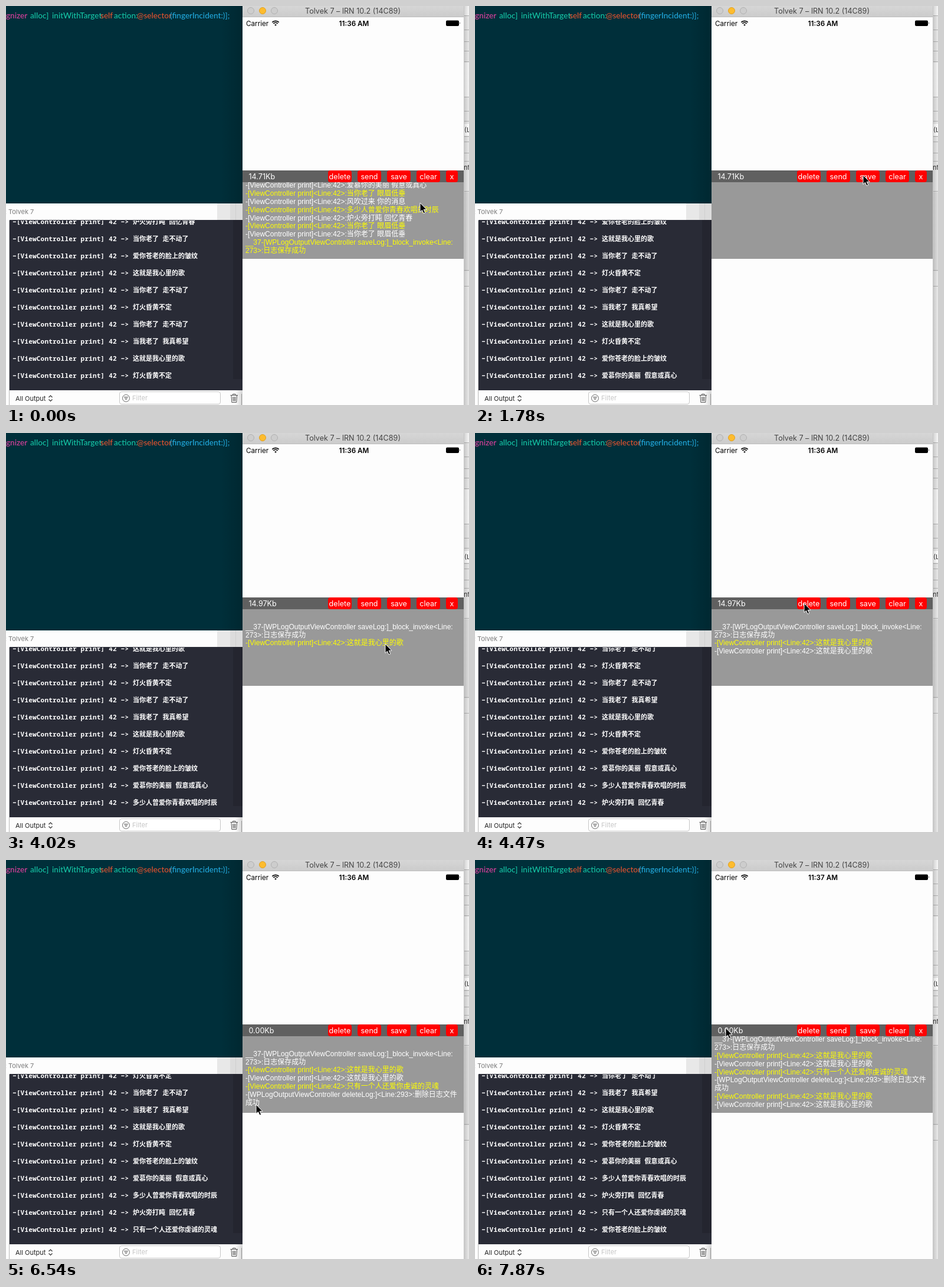
Recreate the animation shown at these times as an HTML page. Size 785 by 677 pixels, loop 8 s.

```html
<!DOCTYPE html>
<html lang="zh-CN">
<head>
<meta charset="utf-8">
<title>Log panel</title>
<style>
  html, body { margin: 0; width: 100%; height: 100%; overflow: hidden; }
  svg { display: block; }
  text { white-space: pre; font: 12.6px Inter, "Open Sans", sans-serif; }
  .mid { text-anchor: middle; }
  .code text { font: 500 13.6px Lato, sans-serif; }
  .small text { font-size: 11px; }
  #console text { font: 600 11px "Noto Sans Mono", "Noto Sans CJK SC", "Noto Sans CJK", monospace; fill: #fff; }
  #console .head { letter-spacing: .2px; }
  #panel text { font: 12px "Liberation Sans", "Noto Sans CJK SC", "Noto Sans CJK", sans-serif; }
</style>
</head>
<body>
<svg width="785" height="677" viewBox="0 0 785 677">
  <defs>
    <clipPath id="consoleClip"><path d="M6 364H401V651H6Z"/></clipPath>
    <clipPath id="panelClip"><path d="M401 299H776V429H401Z"/></clipPath>
    <linearGradient id="bar" x2="0" y2="1"><stop stop-color="#d6d6d6"/><stop offset="1" stop-color="#cbcbcb"/></linearGradient>
    <linearGradient id="shade"><stop stop-color="#000" stop-opacity="0"/><stop offset="1" stop-color="#000" stop-opacity=".16"/></linearGradient>
  </defs>
  <rect width="785" height="677" fill="#fdfdfd"/>

  <!-- editor -->
  <rect width="401" height="335" fill="#002f3a"/>
  <g class="code">
    <text x="0" y="21" fill="#d9409c">gnizer</text>
    <text x="41" y="21" fill="#14c3a4">alloc]</text>
    <text x="78" y="21" fill="#14c3a4">initWithTarget:</text>
    <text x="160" y="21" fill="#e0522f">self</text>
    <text x="183" y="21" fill="#14c3a4">action:</text>
    <text x="222" y="21" fill="#e0522f">@selector</text>
    <text x="278" y="21" fill="#21a8dc">(fingerIncident:)];</text>
  </g>
  <rect x="364" width="37" height="335" fill="url(#shade)"/>

  <!-- tab strip -->
  <rect x="358" y="335" width="22" height="28" fill="#e8e8e8"/>
  <rect x="380" y="335" width="21" height="28" fill="#dcdcdc"/>
  <path d="M389.5 335V363" stroke="#cfcfcf"/>
  <g class="small" fill="#7c7c7c"><text x="-2" y="353">:</text><text x="4" y="353">Tolvek 7</text></g>

  <!-- console -->
  <rect x="6" y="363" width="395" height="289" fill="#292b36"/>
  <rect x="385" y="363" width="16" height="270" fill="#000" opacity=".13"/>
  <path d="M5.5 364V677" stroke="#b8b8b8"/>
  <g id="console" clip-path="url(#consoleClip)"></g>
  <g class="small">
    <text x="16" y="670" fill="#222">All Output</text>
    <path d="M72.5 664L75.5 661L78.5 664M72.5 667.5L75.5 670.5L78.5 667.5" fill="none" stroke="#333" stroke-width="1.2"/>
    <rect x="192.5" y="654.5" width="171" height="21" rx="3.5" fill="#fff" stroke="#c6c6c6"/>
    <circle cx="203.5" cy="665.5" r="6" fill="none" stroke="#666"/>
    <path d="M200 663.5H207M201 665.5H206M202 667.5H205" stroke="#666"/>
    <text x="214" y="669" fill="#c6c6c6">Filter</text>
    <path d="M380.5 660.5H393M384.5 660V658.5H389V660M382 661L382.8 672.5H390.7L391.5 661M384.7 663L385 670.5M386.8 663V670.5M388.8 663L388.5 670.5" fill="none" stroke="#555"/>
    <rect x="388" y="652" width="13" height="25" fill="url(#shade)"/>
    <path d="M399.5 658V677" stroke="#999"/>
  </g>

  <!-- window behind, right edge -->
  <rect x="776" width="9" height="677" fill="#e9e9e9"/>
  <path d="M777 0H785V16H777ZM777 96H785V155H777Z" fill="#f6f6f6"/>
  <path d="M777 316H785V450H777Z" fill="#dedede"/>
  <path d="M777 16.5h8m-8 24h8m-8 20h8m-8 16h8m-8 18h8m-8 60h8m-8 24h8m-8 17h8m-8 26h8m-8 9h8m-8 19h8m-8 14h8m-8 51h8m-8 134h8m-8 27h8" stroke="#b4b4b4"/>
  <rect x="777" y="200" width="8" height="20" fill="#fff"/>
  <g class="small" fill="#333"><text x="777" y="214">(L</text><text x="776" y="278">nt</text></g>
  <rect x="-785" width="9" height="677" fill="url(#shade)" transform="scale(-1 1)"/>

  <!-- phone window -->
  <rect x="401" width="375" height="677" fill="#fdfdfd"/>
  <rect x="401" width="375" height="19" fill="url(#bar)"/>
  <path d="M401 18.5H776" stroke="#bcbcbc"/>
  <g fill="#cdcdcd" stroke="#b1b1b1">
    <circle cx="415" cy="8" r="5.5"/><circle cx="455" cy="8" r="5.5"/>
    <circle cx="435" cy="8" r="5.5" fill="#fdbc2e" stroke="#dfa023"/>
  </g>
  <text class="mid" x="588" y="13" fill="#444">Tolvek 7 – lRN 10.2 (14C89)</text>
  <text x="407" y="33.5" style="font-size:11.7px">Carrier</text>
  <g fill="none" stroke="#000" stroke-width="1.7">
    <path d="M451.3 27.6A8.3 8.3 0 0 1 462.7 27.6M453.4 29.9A5.2 5.2 0 0 1 460.6 29.9"/>
    <path d="M457 33.8L455.2 31.9A2.6 2.6 0 0 1 458.8 31.9Z" fill="#000" stroke="none"/>
  </g>
  <text id="clock" class="mid" x="590" y="33.5" style="font-size:11.7px;font-weight:600"></text>
  <rect x="746" y="24.5" width="22" height="9.5" rx="2"/>
  <path d="M769 27.2Q770.6 29 769 30.8Z"/>

  <!-- log panel -->
  <rect x="401" y="299" width="375" height="130" fill="#999"/>
  <g id="panel" clip-path="url(#panelClip)"></g>
  <rect x="401" y="279" width="375" height="20" fill="#606060"/>
  <text id="size" x="411.5" y="293.5" fill="#fff"></text>
  <g id="buttons"></g>

  <path id="cursor" d="M0 0V15.5L3.5 12.3L6 18L8.7 16.9L6.2 11.3H11Z" stroke="#fff"/>
</svg>
<script>
const LOOP = 8000, STEP = 148.3;
const $ = id => document.getElementById(id);
const text = (x, y, s, attrs = '') =>
  `<text x="${x}" y="${y}" ${attrs}>${s.replace(/</g, '&lt;')}</text>`;

$('buttons').innerHTML = [[546, 40, 'delete'], [596, 40, 'send'], [646, 40, 'save'], [696, 40, 'clear'], [746, 20, 'x']]
  .map(([x, w, s]) => `<rect x="${x}" y="279" width="${w}" height="20" rx="4" fill="#f00"/>` +
    text(x + w / 2, 293.5, s, 'class="mid" fill="#fff"')).join('');

const walk = '当你老了 走不动了', eyes = '当你老了 眼眉低垂', song = '这就是我心里的歌',
  lamp = '灯火昏黄不定', face = '爱你苍老的脸上的皱纹', fire = '炉火旁打盹 回忆青春',
  beauty = '爱慕你的美丽 假意或真心', many = '多少人曾爱你青春欢唱的时辰', soul = '只有一个人还爱你虔诚的灵魂';

const output = [fire, walk, face, song, walk, lamp, walk, '当我老了 我真希望', song, lamp,
  face, beauty, many, fire, soul, face];
const printSteps = [3, 12, 20, 29, 37, 46];

// Log entries: [step of appearance, text]
const print = s => '-[ViewController print]<Line:42>:' + s;
const saved = '__37-[WPLogOutputViewController saveLog:]_block_invoke<Line:\n273>:日志保存成功';
const deleted = '-[WPLogOutputViewController deleteLog:]<Line:293>:删除日志文件\n成功';
const CLEAR = 10;
const before = [
  ...[beauty, eyes, '风吹过来 你的消息', many, fire, eyes, eyes].map(s => [0, print(s)]),
  [0, saved], [3, print('睡意昏沉')]
];
const after = [[14, saved], [20, print(song)], [29, print(song)], [37, print(soul)],
  [37, deleted], [46, print(song)], [53, print(song)]];

// Pointer keys: [step, x, y]
const path = [[0, 702, 334], [3, 716, 318], [5, 716, 318], [8, 718, 282], [9, 718, 282],
  [12, 658, 287], [13, 658, 287], [16, 774, 464], [23, 774, 464], [30, 558, 289],
  [38, 558, 289], [44, 424, 415], [46, 424, 415], [53, 425, 285]];

function pointer(k) {
  const i = Math.min(path.findLastIndex(p => p[0] <= k), path.length - 2);
  const [a, x, y] = path[i], [b, x2, y2] = path[i + 1];
  const u = (k - a) / (b - a), e = u * u * (3 - 2 * u);
  return [x + (x2 - x) * e, y + (y2 - y) * e];
}

function consoleRows(k) {
  const first = printSteps.filter(s => s <= k).length;
  return output.slice(first, first + 10).map((s, i) => {
    const y = 370 + i * 29;
    return text(11, y, '−[ViewController print] 42 −> ', 'class="head"') + text(215, y, s);
  }).join('');
}

function panelRows(k) {
  const rows = (k < CLEAR ? before : after).filter(e => e[0] <= k)
    .flatMap((e, i) => e[1].split('\n').map(s => [s, i % 2 ? '#ff0' : '#fff']));
  const top = Math.min(332.8, 418.8 - (rows.length - 1) * 13.8);
  return rows.map(([s, fill], i) => text(406, top + i * 13.8, s, `fill="${fill}"`)).join('');
}

let shown = -1;
function draw(now) {
  const k = Math.floor((now % LOOP + 8) / STEP);
  if (k !== shown) {
    shown = k;
    $('console').innerHTML = consoleRows(k);
    $('panel').innerHTML = panelRows(k);
    $('size').textContent = k < 14 ? '14.71Kb' : k < 37 ? '14.97Kb' : '0.00Kb';
    $('clock').textContent = k < 50 ? '11:36 AM' : '11:37 AM';
    $('cursor').setAttribute('transform', `translate(${pointer(k)})`);
  }
  requestAnimationFrame(draw);
}
draw(performance.now());
</script>
</body>
</html>
```
